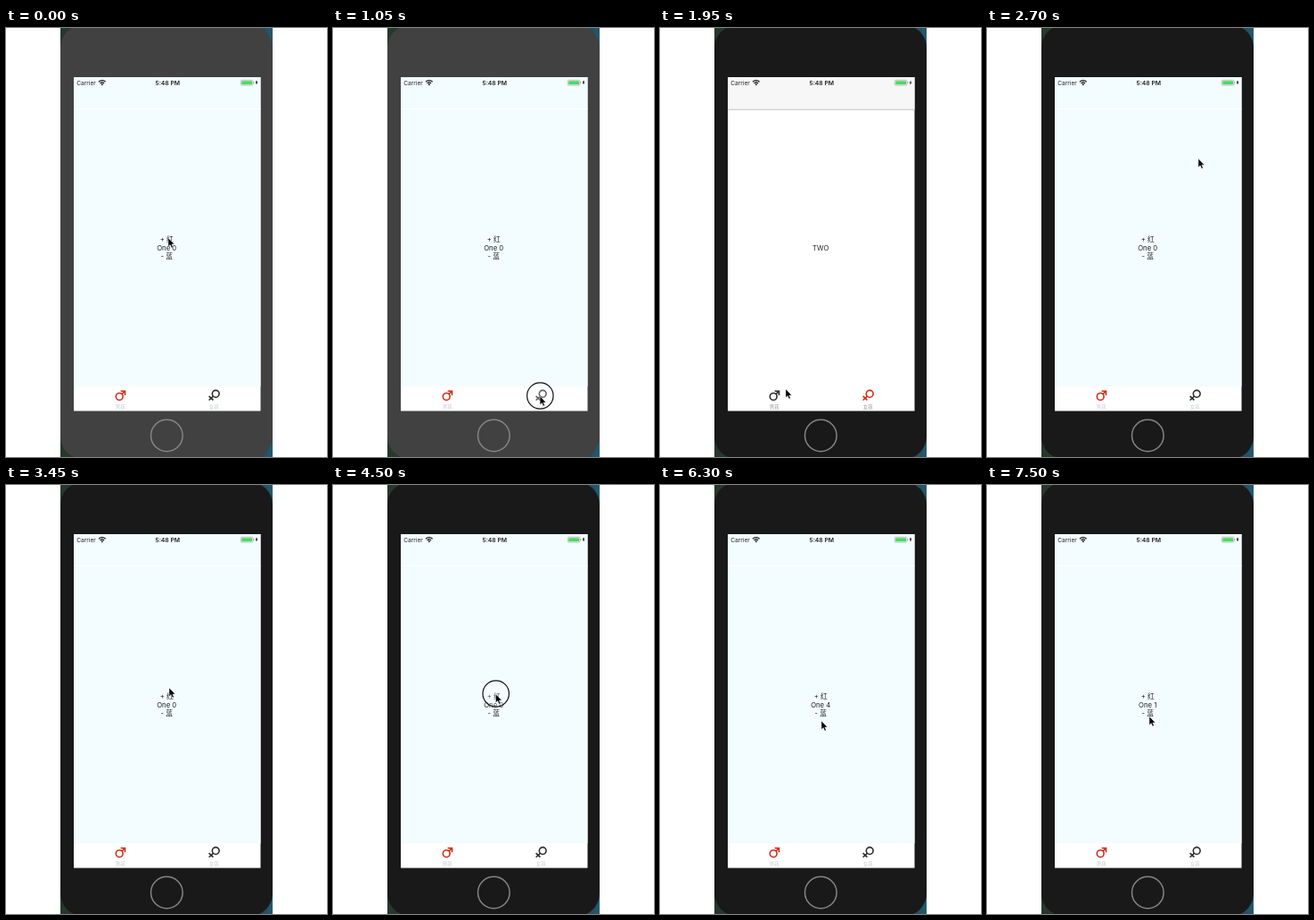
An HTML page that plays this animation: 360x480 px, repeating every 8 s.

```html
<!DOCTYPE html>
<html lang="en">
<head>
<meta charset="utf-8">
<style>
  html, body { margin: 0; width: 100%; height: 100%; overflow: hidden; background: #fff; }
  svg { display: block; width: 100%; height: 100%; }
  text { font-family: Inter, "Noto Sans CJK SC", "Noto Sans CJK", sans-serif; text-anchor: middle; fill: #222; }
  .body text { font-size: 7.7px; }
  .tab { fill: none; stroke: currentColor; stroke-width: 1.6; }
  .label { font-size: 5.5px; }
</style>
</head>
<body>
<svg viewBox="0 0 360 480">
  <defs>
    <linearGradient id="wall">
      <stop offset="0" stop-color="#26382b"/>
      <stop offset=".9" stop-color="#303a34"/>
      <stop offset="1" stop-color="#235a73"/>
    </linearGradient>
  </defs>
  <rect x="61" width="238" height="480" fill="url(#wall)"/>
  <rect id="phone" x="61" y="-3" width="238" height="485" rx="25"/>
  <circle cx="180.3" cy="456" r="17.8" fill="none" stroke="#858585" stroke-width="1.5"/>
  <rect x="76" y="55" width="209.5" height="373.5" fill="#fff"/>

  <g id="one" class="body">
    <rect x="76" y="55" width="209.5" height="346" fill="#f3fcff"/>
    <path d="M76 90.5h209.5" stroke="#fff"/>
    <text x="180.2" y="239.2">+ 红</text>
    <text id="count" x="180.2" y="248.6"></text>
    <text x="180.2" y="258.2">- 蓝</text>
    <rect x="280.2" y="59.3" width="1.6" height="3.2" fill="#222"/>
  </g>
  <g id="two" class="body">
    <rect x="76" y="55" width="209.5" height="36" fill="#f7f7f7"/>
    <path d="M76 91.3h209.5" stroke="#b8b8b8" stroke-width=".8"/>
    <text x="180.2" y="248.6">TWO</text>
    <path d="M281.5 58.5l-2 3h1.3l-.5 2.5 2.2-3.3h-1.3z" fill="#222"/>
  </g>

  <g>
    <text x="90" y="63.7" font-size="6.6">Carrier</text>
    <text x="181.3" y="63.7" font-size="6.8" font-weight="600">5:48 PM</text>
    <g fill="none" stroke="#111" stroke-width="1.2">
      <path d="M104 60.2a5.4 5.4 0 0 1 7.6 0M105.6 62a3.2 3.2 0 0 1 4.4 0"/>
      <circle cx="107.8" cy="63.3" r=".4"/>
    </g>
    <rect x="263.3" y="58.3" width="13.6" height="5.8" rx="1.2" fill="#fff" stroke="#999" stroke-width=".6"/>
    <rect x="264.2" y="59.2" width="11.8" height="4" rx=".5" fill="#4cd964"/>
    <path d="M277.8 60.2v2" stroke="#888" stroke-width=".8"/>
  </g>

  <g id="male" class="tab">
    <circle cx="127.2" cy="412.4" r="3.9"/>
    <path d="M130 409.6l3.4-3.2M128.6 406.3h4.9v4.8"/>
  </g>
  <g id="female" class="tab">
    <circle cx="235.2" cy="409.3" r="3.9"/>
    <path d="M232.4 412.1l-4.8 4.4M227.6 411.8l4.8 4.6"/>
  </g>
  <g id="labels">
    <text class="label" x="128.3" y="426.3">男孩</text>
    <text class="label" x="233.2" y="426.3">女孩</text>
  </g>

  <g id="cursor">
    <circle id="ring" cx=".2" cy="-.5" r="14.7" fill="#fff" fill-opacity=".25" stroke="#111" stroke-width="1.2"/>
    <path d="M0 0V9.5L2.2 7.5L3.7 11L5.3 10.3L3.8 6.9H6.8Z" fill="#000" stroke="#fff" stroke-width=".4"/>
  </g>
</svg>
<script>
  const LOOP = 8000, STEP = 150;
  const $ = id => document.getElementById(id);

  // Pointer path: time, x, y
  const path = [
    [0, 182, 235], [300, 165, 305], [450, 133, 370], [600, 150, 404],
    [900, 232, 412], [1500, 232.5, 412], [1950, 141, 404], [2100, 129, 411],
    [2400, 129, 411], [2850, 291, 14], [3150, 194, 190], [3300, 179, 220],
    [3450, 183, 227], [3600, 182, 235], [3900, 182, 235], [4200, 182, 243],
    [4350, 182, 243], [4500, 182.5, 234], [5250, 182.5, 234], [5400, 182, 230],
    [5700, 106, 62], [6300, 181, 264], [6450, 182, 259], [8000, 182, 259]
  ];
  const presses = [1050, 1350, 2250, 4500, 4800, 4950, 6600, 7050, 7350];
  const counts = [[0, 0], [4650, 1], [4800, 2], [4950, 3], [5100, 4], [6750, 3], [7200, 2], [7500, 1]];

  function pointerAt(t) {
    const i = path.findIndex(p => p[0] > t);
    const [t0, x0, y0] = path[i - 1], [t1, x1, y1] = path[i];
    const k = (t - t0) / (t1 - t0);
    return [x0 + (x1 - x0) * k, y0 + (y1 - y0) * k];
  }

  const show = (id, on) => { $(id).style.display = on ? "" : "none"; };

  function draw(now) {
    const t = Math.floor((now % LOOP) / STEP) * STEP;
    const second = t >= 1500 && t < 2400;
    show("one", !second);
    show("two", second);
    show("ring", presses.includes(t));
    $("phone").style.fill = t < 1200 ? "#414141" : "#191919";
    $("male").style.color = second ? "#2c2c2c" : "#d52b16";
    $("female").style.color = second ? "#d52b16" : "#2c2c2c";
    for (const label of $("labels").children) label.style.fill = second ? "#999" : "#c3ccd6";
    $("count").textContent = "One " + counts.filter(c => c[0] <= t).pop()[1];
    $("cursor").setAttribute("transform", `translate(${pointerAt(t)})`);
  }

  const start = performance.now();
  function tick() {
    draw(performance.now() - start);
    requestAnimationFrame(tick);
  }
  tick();
</script>
</body>
</html>
```
